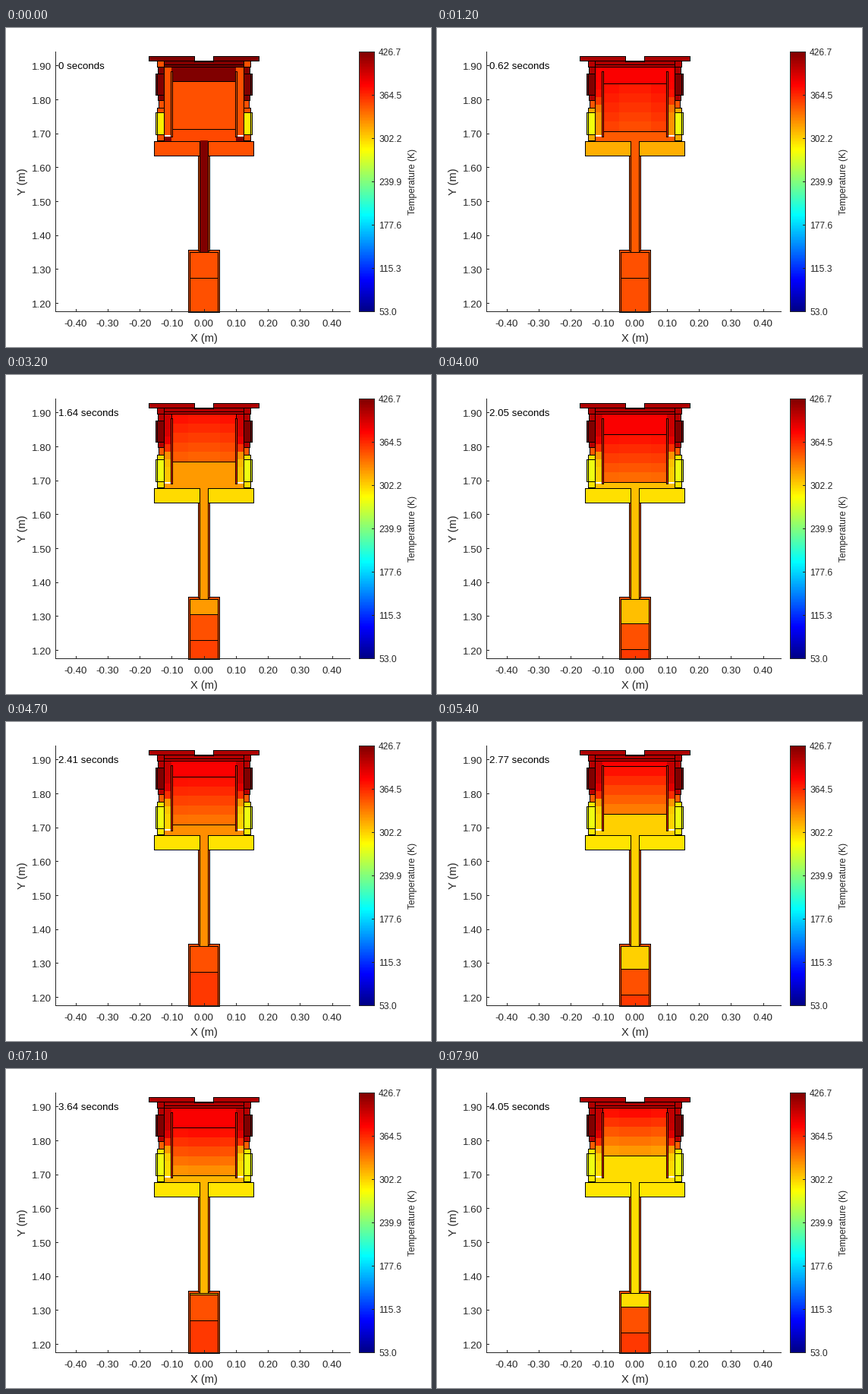
Animation, 560 px wide and 420 px high, one loop 8 s. Source, as a matplotlib script:

```python
import numpy as np
import matplotlib.pyplot as plt
from matplotlib.animation import FuncAnimation
from matplotlib.patches import Rectangle

W, H, FRAMES, FPS = 560, 420, 80, 19.5
RPM = 100
LINE, GREY = 0.72, "#262626"
MIRROR = 521                            # x -> MIRROR - x
DISP_H, PIST_H = 63, 34

plt.rcParams["font.family"] = "Liberation Sans"
fig = plt.figure(figsize=(W / 100, H / 100), dpi=100, facecolor="white")
ax = fig.add_axes([0, 0, 1, 1])
ax.set_xlim(0, W)
ax.set_ylim(H, 0)
ax.axis("off")


def jet(level):
    """Jet colour for a level from 0 (cold) to 64 (hot)."""
    k = float(np.clip(level, 0, 64))
    rgb = min(k - 24, 72 - k), min(k - 8, 56 - k), min(k + 8, 40 - k)
    return tuple(np.clip(np.array(rgb) / 16, 0, 1))


def box(x0, y0, x1, y1, level=None, edge=True):
    face = "none" if level is None else jet(level)
    patch = Rectangle((x0, y0), x1 - x0, y1 - y0, facecolor=face,
                      edgecolor="black" if edge else "none",
                      linewidth=LINE if edge else 0, antialiased=False)
    return ax.add_patch(patch)


def line(xs, ys, color="black"):
    ax.plot(xs, ys, color=color, lw=LINE, antialiased=False,
            solid_capstyle="butt")


def label(x, y, text, px, ha="left", color=GREY, **kw):
    return ax.text(x, y, text, fontsize=px * 0.72, ha=ha, color=color,
                   va=kw.pop("va", "baseline"), **kw)


def crank(i):
    return 2 * np.pi * RPM / 60 * i / FPS


def ease(start, end, tau):
    """Level that settles exponentially, tau in frames."""
    return lambda i: end + (start - end) * np.exp(-i / tau)


def cold(i):
    return 49.5 - 7.5 * i / FRAMES + 2 * np.cos(crank(i))


def tube(i):
    return cold(i) + 13 * np.exp(-3 * i)


parts = []


def part(bounds, rule, edge=True, mirror=False):
    """A region whose level follows a rule, optionally on both sides."""
    x0, y0, x1, y1 = bounds
    patches = [box(*bounds, 51, edge)]
    if mirror:
        patches.append(box(MIRROR - x1, y0, MIRROR - x0, y1, 51, edge))
    parts.append((patches, rule))
    return patches[0]


# Heater cap
cap = ease(64, 61, 5)
part((188, 37, 248, 43), cap, mirror=True)
part((199, 43, 208, 51), ease(51, 61, 4), mirror=True)
part((208, 43, 313, 48), cap)
part((208, 48, 313, 51), ease(64, 59.5, 5))
line((248, 273), (44, 44))

# Side blocks
part((200, 51, 208, 95), ease(64, 60.5, 8), mirror=True)
part((197, 60, 208, 88), ease(64, 64, 1), mirror=True)
part((201, 95, 208, 105), ease(51, 50, 30), mirror=True)
part((199, 105, 208, 148), ease(51, 41, 14), mirror=True)
part((197, 111, 208, 140), ease(41, 39, 6), mirror=True)
for x in (199, MIRROR - 199):
    line((x, x), (60, 88))
    line((x, x), (111, 140))

# Flange, tube and lower cylinder
part((195, 149, 255, 168), ease(51, 41.6, 12), mirror=True)
box(240, 292, 281, 374, 51)
box(253, 168, 268, 293, 51)
box(242, 295, 279, 374, 51)
cyl_gas = part((243, 296, 279, 300), tube, edge=False)
piston = box(242, 295, 279, 329, 51)
bounce = part((242, 329, 279, 374), lambda i: 51 + 1.5 * min(i / 40, 1) ** 2)
line((242, 279), (295, 295))

# Annulus: a sharp step from the hot end to the cold end
hot_end, cold_end = ease(51, 60, 15), ease(51, 42, 18)


def annulus(y):
    m = 1 / (1 + np.exp((99 - y) / 6))
    return lambda i: hot_end(i) * (1 - m) + cold_end(i) * m


for y in range(51, 141, 10):
    part((208, y, 218, y + 10), annulus(y + 5), edge=False, mirror=True)
part((208, 143, 218, 149), tube, edge=False, mirror=True)

# Working spaces
hot_gas = part((218, 51, 303, 71), ease(64, 56.3, 2), edge=False)
cold_gas = part((218, 134, 303, 149), cold, edge=False)
box(208, 51, 313, 149)
part((256, 148, 266, 296), tube, edge=False)
for x in (255, 266):
    line((x, x), (149, 295))

# Displacer
cell_x = (218, 240, 282, 303)
cell_h = DISP_H / 5
cells = [(r, c, box(cell_x[c], 71, cell_x[c + 1], 71 + cell_h, 51, False))
         for r in range(5) for c in range(3)]
displacer = box(218, 71, 303, 134)
part((217, 57, 219, 143), ease(51, 54, 3), mirror=True)


def cell_level(i, r, c):
    top, low = 55, 53 - 7 * i / FRAMES
    centre = (i / 60 - 0.9) * (c == 1)
    return 51 + (top - 51 + (low - top) * r / 4 + centre) * (1 - np.exp(-i / 2))


# Axes
line((65, 65), (31, 373), GREY)
line((65, 453), (373, 373), GREY)
for n in range(8):
    y = 362 - 44.65 * n
    line((65, 68), (y, y), GREY)
    label(60, y + 5.7, f"{1.2 + n / 10:.2f}", 13.33, "right")
for n in range(-4, 5):
    x = 260.5 + 42.25 * n
    line((x, x), (370, 373), GREY)
    label(x + 0.3, 393.3, f"{n / 10:.2f}", 13.33, "center")
label(260.5, 413.3, "X (m)", 14.67, "center")
label(22, 202, "Y (m)", 14.67, "center", va="center", rotation=90)

# Colour bar
ramp = np.array([[jet(k / 4)] for k in range(256, 0, -1)])
ax.imshow(ramp, extent=(465, 486, 374, 31), aspect="auto",
          interpolation="nearest")
ax.add_patch(Rectangle((465, 31), 20, 342, fill=False, edgecolor=GREY,
                       linewidth=LINE, antialiased=False))
for n in range(7):
    y = 373 - 57 * n
    line((482, 485), (y, y), GREY)
    label(491, y + 5, f"{53.02 + 62.287 * n:.1f}", 12)
label(536, 202, "Temperature (K)", 12, "center", va="center", rotation=90)

clock = label(69, 54.3, "0 seconds", 13.33, color="black")


def span(patch, top, bottom):
    patch.set_y(top)
    patch.set_height(max(bottom - top, 0))


def update(i):
    sin, cos = np.sin(crank(i)), np.cos(crank(i))
    disp = round(68 + 17 * sin + 2.4 * cos ** 2)
    pist = round(312 - 17 * cos + 1.3 * sin ** 2)

    for patches, rule in parts:
        for p in patches:
            p.set_facecolor(jet(rule(i)))

    span(hot_gas, 51, disp)
    span(cold_gas, disp + DISP_H, 149)
    span(displacer, disp, disp + DISP_H)
    for r, c, p in cells:
        p.set_y(disp + r * cell_h)
        p.set_facecolor(jet(cell_level(i, r, c)))

    span(cyl_gas, 296, pist)
    span(piston, pist, pist + PIST_H)
    span(bounce, pist + PIST_H, 374)
    clock.set_text(f"{round(i / FPS, 2):g} seconds")


anim = FuncAnimation(fig, update, frames=FRAMES, interval=1000 / 10,
                     repeat=True, repeat_delay=0, init_func=lambda: update(0))
plt.show()
```
